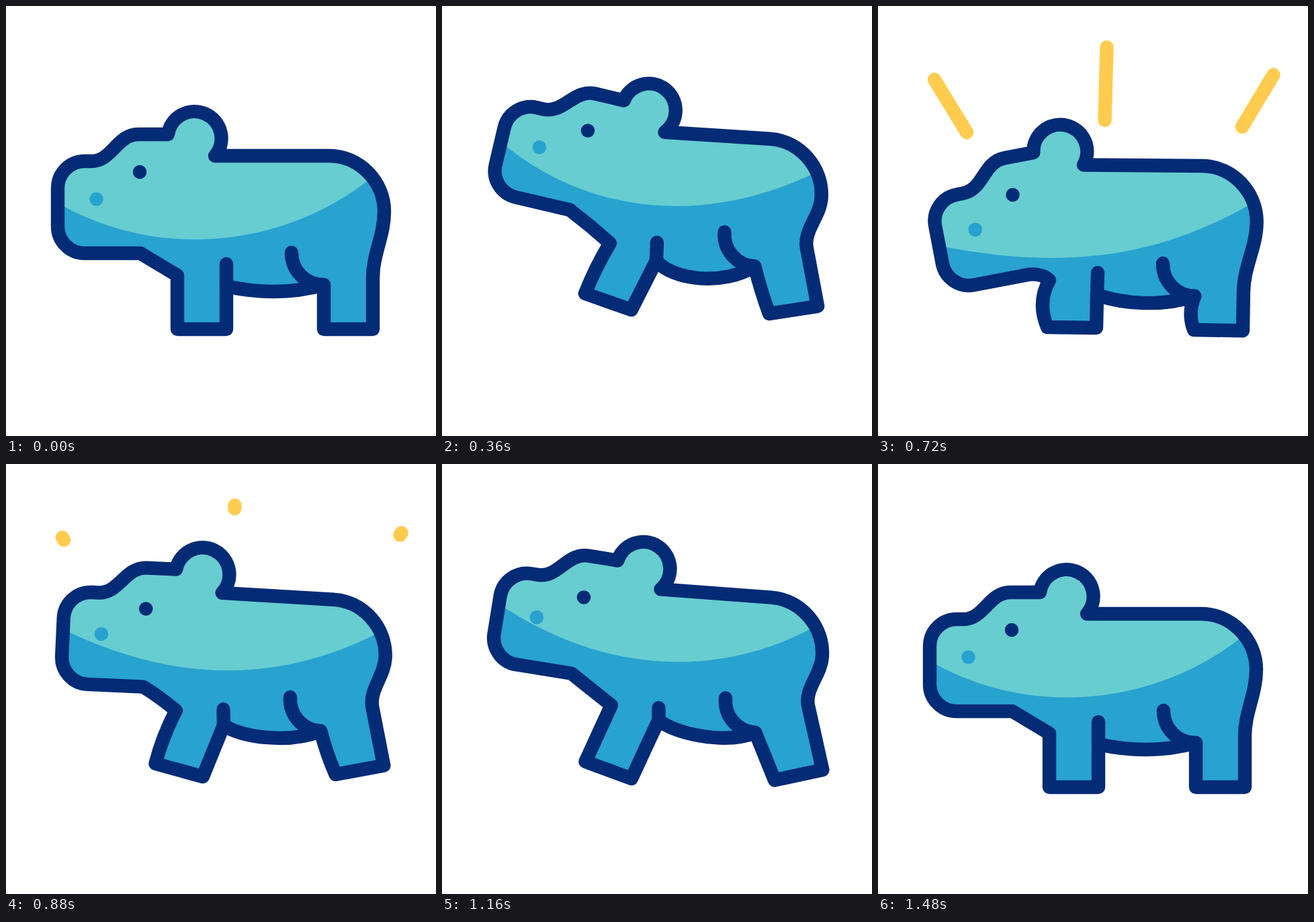
An HTML page that plays this animation: 640x640 px, repeating every 2000 ms.

```html
<!DOCTYPE html>
<html lang="en">
<head>
<meta charset="utf-8">
<title>Jumping hippo</title>
<style>
  html, body { margin: 0; width: 100%; height: 100%; overflow: hidden; background: #fff; }
  svg { display: block; width: 100%; height: 100%; }
  .line { fill: none; stroke: #042b75; stroke-width: 20.4; stroke-linecap: round; stroke-linejoin: round; }
  .ray { fill: none; stroke: #ffcc50; stroke-width: 20.4; stroke-linecap: round; }
</style>
</head>
<body>
<svg viewBox="0 0 640 640">
  <defs><clipPath id="inside"><path id="clip"/></clipPath></defs>
  <g id="rays"></g>
  <path id="skin" fill="#28a2cf"/>
  <path id="light" fill="#67cdd1" clip-path="url(#inside)"/>
  <path id="outline" class="line"/>
  <path id="creases" class="line"/>
  <g id="face">
    <circle id="eye" r="10.3" fill="#042b75"/>
    <circle id="nostril" r="10.3" fill="#28a2cf"/>
  </g>
</svg>
<script>
const LOOP = 2000, STEP = 40, END = 1480;
const $ = id => document.getElementById(id);
const rad = d => d * Math.PI / 180;

// body, head: x, y, angle. face: shift of eye and nostril within the head.
// foot: x, y, angle of the sole. flex: bend of the legs, sag of the belly.
// light: left height on the snout, right height, start and end slope.
const poses = {
  rest: {
    body: [481, 223, 0], head: [199, 247, 0], face: [0, 0],
    thigh: [425, 367], hip: [546, 405], backFoot: [473, 481, 0],
    knee: [255, 401], arm: [328, 384], pit: [328, 417], frontFoot: [255, 481, 0],
    flex: [0, 0], light: [46, 237, 30.2, 42.5]
  },
  crouch: {
    body: [483, 238, 0.9], head: [200.5, 281, -10.8], face: [0, 0],
    thigh: [424, 383], hip: [544, 425], backFoot: [470, 482, 1],
    knee: [255, 408], arm: [327, 397], pit: [326, 430], frontFoot: [252, 478, 0.8],
    flex: [1, 0], light: [54, 288, 11, 31]
  },
  rise: {
    body: [488, 197.7, 3.6], head: [217, 185.5, 13.2], face: [0, 0],
    thigh: [420.5, 336.5], hip: [543, 361], backFoot: [487, 458, -8.8],
    knee: [250, 353], arm: [320, 352], pit: [319, 379], frontFoot: [213, 428, 19.4],
    flex: [0.22, 6], light: [46, 243, 40, 27]
  },
  peak: {
    body: [495, 177, 7.4], head: [233.5, 141, 20.7], face: [0, 0],
    thigh: [419.5, 311], hip: [540, 344], backFoot: [486, 450, -12],
    knee: [247, 312], arm: [316, 321], pit: [315.5, 343], frontFoot: [190, 390, 30.4],
    flex: [0, 3], light: [46, 229, 47, 24]
  },
  lift: {
    body: [487, 201.7, 3], head: [208.7, 210.7, 2.6], face: [-0.5, 4.8],
    thigh: [423, 347], hip: [545.5, 363], backFoot: [490.5, 462, -10.4],
    knee: [253, 367], arm: [323.5, 365], pit: [324, 389], frontFoot: [222.5, 446, 15.4],
    flex: [0.3, -3], light: [41, 245, 26, 28.5]
  },
  fall: {
    body: [490, 198.7, 4.1], head: [211, 192.2, 9.2], face: [0, 6.3],
    thigh: [422, 348.5], hip: [545.3, 361], backFoot: [495, 470.5, -12],
    knee: [252, 359], arm: [322.5, 363], pit: [322.5, 381], frontFoot: [213.5, 443, 20.2],
    flex: [0, -6], light: [36, 236, 34, 30]
  }
};
const times = [0, 170, 360, 520, 720, 880, 1035, 1160, END];
const order = ["rest", "crouch", "rise", "peak", "crouch", "lift", "peak", "fall", "rest"];

// Smooth curve through the keys that never overshoots them.
function curve(ts, vs, t) {
  const n = ts.length - 1;
  if (t <= ts[0]) return vs[0];
  if (t >= ts[n]) return vs[n];
  const rate = i => (vs[i + 1] - vs[i]) / (ts[i + 1] - ts[i]);
  const slope = i => {
    if (i === 0 || i === n) return 0;
    const a = rate(i - 1), b = rate(i);
    return a * b <= 0 ? 0 : 2 * a * b / (a + b);
  };
  let i = 0;
  while (t > ts[i + 1]) i++;
  const h = ts[i + 1] - ts[i], u = (t - ts[i]) / h, w = 1 - u;
  return vs[i] * (1 + 2 * u) * w * w + vs[i + 1] * u * u * (3 - 2 * u)
    + h * u * w * (slope(i) * w - slope(i + 1) * u);
}

function poseAt(t) {
  const p = {};
  for (const part in poses.rest)
    p[part] = poses.rest[part].map((_, k) => curve(times, order.map(n => poses[n][part][k]), t));
  return p;
}

const add = ([x, y], dx, dy) => [x + dx, y + dy];
const turn = (o, x, y, deg) => {
  const c = Math.cos(rad(deg)), s = Math.sin(rad(deg));
  return [o[0] + x * c - y * s, o[1] + x * s + y * c];
};
const xy = p => p[0].toFixed(2) + " " + p[1].toFixed(2);
const seg = (cmd, ...pts) => cmd + pts.map(xy).join(" ");
const mid = (a, b, dx, dy) => [(a[0] + b[0]) / 2 + dx, (a[1] + b[1]) / 2 + dy];
const toward = (a, b, d) => {
  const l = Math.hypot(b[0] - a[0], b[1] - a[1]);
  return [a[0] + (b[0] - a[0]) / l * d, a[1] + (b[1] - a[1]) / l * d];
};
const move = (id, p) => $(id).setAttribute("transform", "translate(" + xy(p) + ")");

const snout = "L117 368 C95 368 77 350 77 328 L77 271 C77 249 95 231 117 231 " +
  "L127 231 C158 231 165 191 197 191 L241 191";

// Tip, inner end, length factors for the inner and outer end.
const rays = [
  { tip: [84, 109.5], base: [132, 188], tail: 1, lead: 1 },
  { tip: [340.5, 61.5], base: [337.5, 170], tail: 1.18, lead: 0.75 },
  { tip: [588.5, 102.5], base: [542.5, 179], tail: 0.98, lead: 1 }
];
for (const r of rays) {
  r.el = document.createElementNS("http://www.w3.org/2000/svg", "path");
  r.el.setAttribute("class", "ray");
  $("rays").append(r.el);
}

function drawRays(t) {
  const lead = curve([400, 520, 560, 600], [186, 31, 15.5, 0], t);
  const tail = t < 520 ? 186 : t < 720 ? 186 - (t - 520) * 0.47 : 92 - (t - 720) * 0.55;
  const on = t > 440 && tail > 0;
  for (const r of rays)
    r.el.setAttribute("d", on ? seg("M", toward(r.tip, r.base, lead * r.lead))
      + seg("L", toward(r.tip, r.base, tail * r.tail)) : "");
}

function drawHippo(p) {
  const [, , tilt] = p.body, [, , nod] = p.head, [bow, sag] = p.flex;
  const body = (x, y) => turn(p.body, x, y, tilt);
  const head = (x, y) => turn(p.head, x - 199, y - 247, nod);
  const groin = turn(p.thigh, 48, 48, tilt);
  const heel = turn(p.backFoot, 73, 0, p.backFoot[2]);
  const palm = turn(p.frontFoot, 73, 0, p.frontFoot[2]);
  const chin = head(200, 368), rump = body(82, 83);
  const reach = Math.hypot(rump[0] - p.hip[0], rump[1] - p.hip[1]) * 0.36;

  const shape = seg("M", chin)
    + snout.replace(/([\d.]+) ([\d.]+)/g, (_, x, y) => xy(head(+x, +y)))
    + "A40 40 0 1 1 " + xy(head(311, 223))
    + seg("L", p.body)
    + seg("C", body(45, 0), body(82, 38), rump)
    + seg("C", turn(rump, 0, reach, tilt), toward(p.hip, heel, -reach), p.hip)
    + seg("L", heel, p.backFoot)
    + seg("Q", mid(p.backFoot, groin, -10 * bow, 0), groin)
    + seg("C", add(groin, tilt - 49, 14 + 2.5 * tilt + sag),
        add(p.pit, 44 - 5.4 * tilt, 10 + 3.9 * tilt + sag), p.pit)
    + seg("L", palm, p.frontFoot)
    + seg("Q", mid(p.frontFoot, p.knee, -17 * bow, -2 * bow), p.knee)
    + seg("Q", mid(p.knee, chin, 5 * bow, -6 * bow), chin) + "Z";
  for (const id of ["clip", "skin", "outline"]) $(id).setAttribute("d", shape);

  $("creases").setAttribute("d", seg("M", p.arm) + seg("L", p.pit)
    + seg("M", p.thigh)
    + seg("C", turn(p.thigh, 0, 27, tilt), turn(groin, -27, 0, tilt), groin));

  const [low, ry, a, b] = p.light;
  const left = head(77, 247 + low), right = [566, ry];
  $("light").setAttribute("d", seg("M", left)
    + seg("C", turn(left, 180, 0, a), turn(right, -180, 0, -b), right)
    + "L640 " + ry.toFixed(2) + "V0H0V" + left[1].toFixed(2) + "Z");

  move("face", p.face);
  move("eye", p.head);
  move("nostril", head(134.5, 287.5));
}

function draw(ms) {
  const t = Math.min(Math.floor((ms % LOOP) / STEP) * STEP, END);
  drawRays(t);
  drawHippo(poseAt(t));
}

const start = performance.now();
function tick() {
  draw(performance.now() - start);
  requestAnimationFrame(tick);
}
draw(0);
requestAnimationFrame(tick);
</script>
</body>
</html>
```
